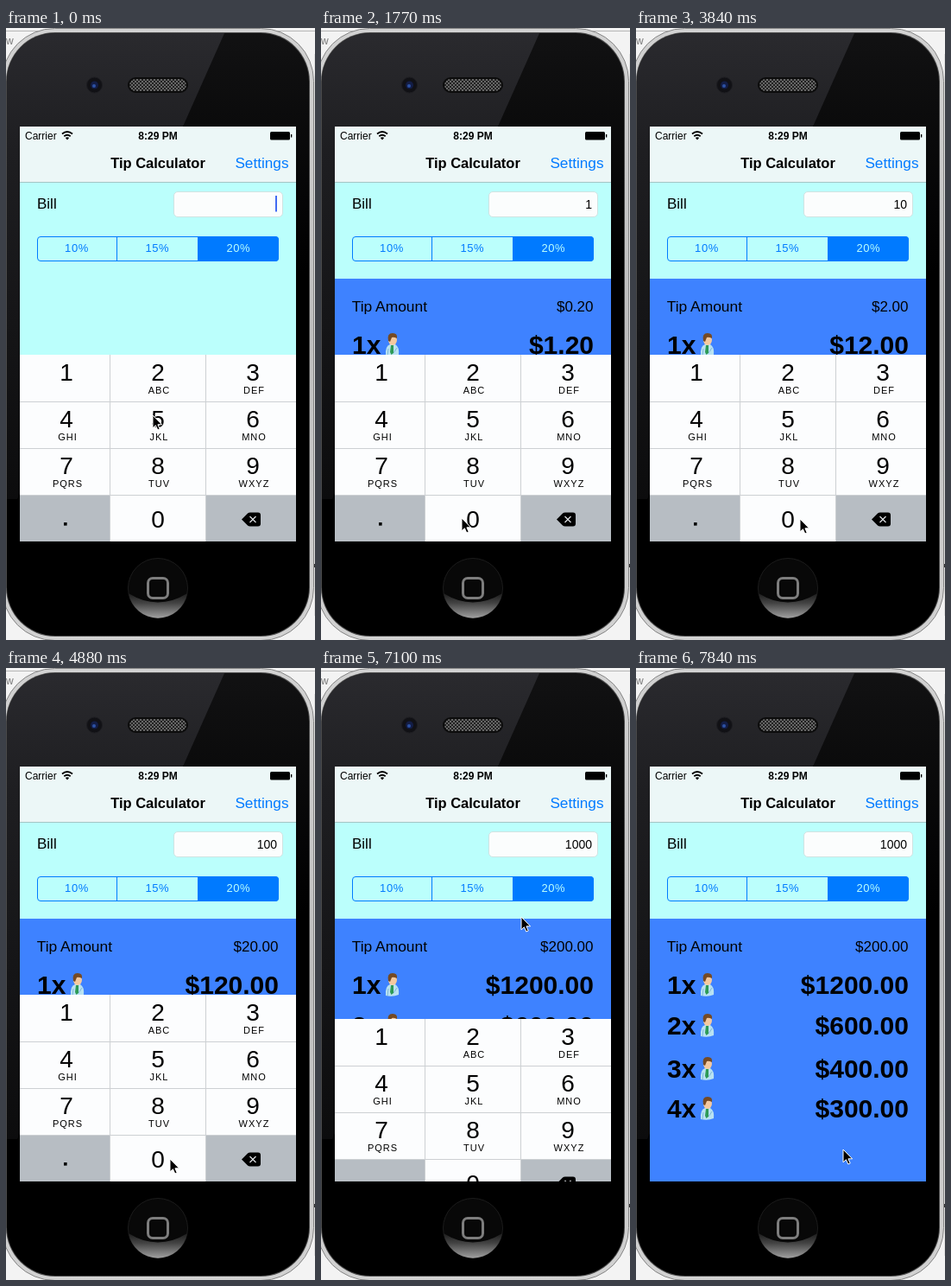
An HTML page for the animation above (8 s loop, 358x708 px).

```html
<!DOCTYPE html>
<html lang="en">
<head>
<meta charset="utf-8">
<title>Tip Calculator</title>
<style>
  html, body { margin: 0; width: 100%; height: 100%; overflow: hidden; background: #f3f3f3; }
  svg { display: block; font-family: "Liberation Sans", Arial, sans-serif; }
  .body { font-size: 17px; }
  .total { font-size: 30px; font-weight: bold; }
  .segment { font-size: 13px; letter-spacing: .6px; fill: #007aff; text-anchor: middle; }
  .digit { font-size: 28px; text-anchor: middle; }
  .letters { font-size: 11px; letter-spacing: 1px; text-anchor: middle; }
  .end { text-anchor: end; }
</style>
</head>
<body>
<svg width="358" height="708" viewBox="0 0 358 708">
  <defs>
    <clipPath id="screen"><rect x="16" y="114" width="320" height="480"/></clipPath>
    <clipPath id="front"><rect x="1" y="6" width="350" height="697" rx="56"/></clipPath>
    <linearGradient id="metal" x2="0" y2="1">
      <stop stop-color="#d2d2d2"/><stop offset=".5" stop-color="#bdbdbd"/><stop offset="1" stop-color="#d2d2d2"/>
    </linearGradient>
    <linearGradient id="glass" x2="0" y2="1">
      <stop stop-color="#121213"/><stop offset=".4" stop-color="#000"/>
    </linearGradient>
    <linearGradient id="glare" x2="0" y2="1">
      <stop stop-color="#2a2a2e"/><stop offset=".25" stop-color="#1e1e21"/><stop offset="1" stop-color="#0c0c0d"/>
    </linearGradient>
    <linearGradient id="home" x2="0" y2="1">
      <stop stop-color="#1c1c1c"/><stop offset=".4" stop-color="#444"/><stop offset="1" stop-color="#a0a0a0"/>
    </linearGradient>
    <pattern id="mesh" width="4" height="4" patternUnits="userSpaceOnUse">
      <rect width="4" height="4" fill="#222"/>
      <path d="M0 0L4 4M4 0L0 4" stroke="#777" stroke-width=".8"/>
    </pattern>
    <g id="person">
      <path d="M2 26Q1 15 7 13L13 13Q18 16 17 25Q10 28 2 26Z" fill="#b9e2f2"/>
      <path d="M4 26L5 18M15 17L11 23" stroke="#7fb8d8"/>
      <path d="M8 14L11 14L11 23L8.5 25L7 22Z" fill="#2e9b57"/>
      <ellipse cx="10" cy="8" rx="5" ry="6" fill="#f4c9a0"/>
      <path d="M5 9Q3 0 10 0Q16 0 15 6Q11 4 9 5L7 10Z" fill="#754a25"/>
    </g>
  </defs>

  <!-- Phone -->
  <path d="M0 3.5H358" stroke="#b5b5b5"/>
  <text x="0" y="19" font-size="12" fill="#777">w</text>
  <path d="M357.5 30V680" stroke="#ddd"/>
  <path d="M103 0V6M0 622H3M353 622H358" stroke="#333" stroke-width="4"/>
  <rect x="-4.5" y=".5" width="361" height="708" rx="61" fill="url(#metal)" stroke="#858585"/>
  <rect x="0" y="5" width="352" height="699" rx="57" fill="#4a4a4a"/>
  <g clip-path="url(#front)">
    <rect width="358" height="708" fill="url(#glass)"/>
    <path d="M0 6H253L13 545H0Z" fill="url(#glare)"/>
  </g>
  <circle cx="102.5" cy="66" r="9" fill="#111115" stroke="#1d1d21"/>
  <circle cx="102.5" cy="66" r="4.5" fill="#131d45"/>
  <circle cx="102" cy="67" r="2" fill="#2c52a5"/>
  <rect x="142" y="58" width="68" height="16" rx="8" fill="url(#mesh)" stroke="#0c0c0c" stroke-width="2"/>
  <circle cx="176" cy="648" r="34.5" fill="#080808" stroke="#1c1c1c"/>
  <path d="M142 654Q176 675 210 654A34.5 34.5 0 0 1 142 654Z" fill="url(#home)"/>
  <rect x="164.5" y="636.5" width="23" height="23" rx="5.5" fill="none" stroke="#7d7d7d" stroke-width="3"/>

  <g clip-path="url(#screen)">
    <rect x="16" y="114" width="320" height="480" fill="#bbfffc"/>
    <rect x="16" y="114" width="320" height="64" fill="#ecf7f7"/>
    <path d="M16 178.5H336" stroke="#a4c5c5"/>

    <!-- Status and navigation -->
    <text x="22" y="129" font-size="12">Carrier</text>
    <path d="M65 122.5Q71 117.5 77 122.5M67.3 125.3Q71 122.3 74.7 125.3" fill="none" stroke="#000" stroke-width="1.8"/>
    <path d="M68.8 127Q71 125.5 73.2 127L71 129.5Z"/>
    <text x="176" y="129" font-size="12" font-weight="bold" text-anchor="middle">8:29 PM</text>
    <rect x="306" y="120" width="23" height="9.5" rx="1.5"/>
    <path d="M330 123H331.3V126.5H330Z"/>
    <text x="176" y="162" font-size="16.5" font-weight="bold" text-anchor="middle">Tip Calculator</text>
    <text x="327.5" y="162" font-size="17.2" class="end" fill="#007aff">Settings</text>

    <!-- Bill -->
    <text x="36" y="209" class="body">Bill</text>
    <rect x="194.5" y="189.5" width="126" height="29" rx="4.5" fill="#fbfdfd" stroke="#cfe3e2"/>
    <text id="bill" x="314" y="209" font-size="14" class="end"></text>
    <rect id="caret" x="312" y="194" width="2" height="18.5" fill="#426bf2"/>
    <rect x="36.5" y="241.5" width="279" height="28" rx="3.5" fill="none" stroke="#007aff"/>
    <path d="M128.5 241V270" stroke="#007aff"/>
    <path d="M222 241H312Q316 241 316 245V266Q316 270 312 270H222Z" fill="#007aff"/>
    <text x="82" y="259" class="segment">10%</text>
    <text x="175.3" y="259" class="segment">15%</text>
    <text x="269.3" y="259" class="segment" style="fill:#bbfffc">20%</text>

    <g id="panel">
      <rect x="16" y="290" width="320" height="304" fill="#3e82ff"/>
      <text x="35.7" y="328" font-size="17.4">Tip Amount</text>
      <text id="tip" x="315.5" y="328" class="body end"></text>
    </g>
    <g id="keypad"><rect x="16" y="378" width="320" height="216" fill="#fcfdfe"/></g>
  </g>

  <path id="cursor" d="M0 0V14.8L3.4 11.7L5.8 17L8.2 16L5.9 10.8H10.6Z" stroke="#fff"/>
</svg>
<script>
const STEP = 147.9, LOOP = 8000;
const $ = id => document.getElementById(id);

function add(parent, tag, attrs, text = '') {
  const node = document.createElementNS('http://www.w3.org/2000/svg', tag);
  for (const name in attrs) node.setAttribute(name, attrs[name]);
  node.textContent = text;
  return parent.appendChild(node);
}

const totals = [377, 424, 474, 520].map((y, i) => {
  add($('panel'), 'text', { x: 36, y, class: 'total' }, `${i + 1}x`);
  add($('panel'), 'use', { href: '#person', x: 73, y: y - 24 });
  return add($('panel'), 'text', { x: 316, y, class: 'total end' });
});

const keypad = $('keypad'), keys = {};
const columns = [[16, 104.5, 70], [121, 110.5, 176], [232, 104, 286]];
const letters = ['', 'ABC', 'DEF', 'GHI', 'JKL', 'MNO', 'PQRS', 'TUV', 'WXYZ'];
[...'123456789.0<'].forEach((label, i) => {
  const [x, width, center] = columns[i % 3], y = 378 + 54 * Math.floor(i / 3);
  const plain = '.<'.includes(label) ? '#b7bdc3' : '#fcfdfe';
  keys[label] = add(keypad, 'rect', { x, y, width, height: 54, fill: plain });
  if (label === '.') add(keypad, 'rect', { x: 67, y: 572, width: 3.6, height: 3.6 });
  else if (label !== '<') add(keypad, 'text', { x: center, y: y + (label === '0' ? 37.5 : 30), class: 'digit' }, label);
  if (letters[i]) add(keypad, 'text', { x: center + 1.5, y: y + 45, class: 'letters' }, letters[i]);
});
add(keypad, 'path', { d: 'M120.5 378V594M231.5 378V594M16 432.5H336M16 486.5H336M16 540.5H336', stroke: '#cdd0d3' });
add(keypad, 'path', { d: 'M273 568.5L280 561.5Q281 560.5 283 560.5H292Q295 560.5 295 563.5V573.5Q295 576.5 292 576.5H283Q281 576.5 280 575.5Z' });
add(keypad, 'path', { d: 'M282.5 565L289.5 572M289.5 565L282.5 572', stroke: '#dfe2e5', 'stroke-width': 1.2 });

// Step, x, y of the pointer tip
const pointerPath = [
  [0, 170, 448], [1, 150, 440], [3, 72, 400], [6, 70, 398], [7, 100, 470], [8, 158, 560], [12, 163, 567],
  [15, 163, 567], [16, 182, 540], [17, 225, 430], [18, 245, 367], [19, 245, 367], [21, 218, 470],
  [23, 191, 567], [24, 190, 568], [43, 190, 568], [44, 193, 550], [46, 225, 340], [47, 232, 288],
  [50, 232, 288], [51, 234, 340], [52, 238, 500], [53, 240, 557], [55, 240, 557]
];
// Step at which each bill amount appears
const bills = [[0, ''], [6, 1], [14, 10], [29, 100], [36, 1000]];
const presses = { 5: '1', 13: '0', 28: '0', 35: '0' };
const caretResets = [0, 6, 13, 28, 36];

function pointerAt(step) {
  const i = pointerPath.findIndex(p => p[0] > step);
  const [s0, x0, y0] = pointerPath[i - 1], [s1, x1, y1] = pointerPath[i];
  const k = (step - s0) / (s1 - s0);
  return [x0 + (x1 - x0) * k, y0 + (y1 - y0) * k];
}

function caretAt(step) {
  if (step >= 48) return 0;
  const phase = (step - caretResets.findLast(s => s <= step)) % 7;
  return phase < 4 ? 1 : phase === 4 ? .5 : 0;
}

// Critically damped spring, from 0 to 1
function spring(seconds) {
  const w = 18.26 * Math.max(0, seconds);
  return 1 - (1 + w) * Math.exp(-w);
}

const shift = (id, x, y) => $(id).setAttribute('transform', `translate(${x} ${y})`);

function render(time) {
  const step = Math.floor((time + 5) / STEP);
  const bill = bills.findLast(([s]) => s <= step)[1];
  $('bill').textContent = bill;
  $('tip').textContent = '$' + (bill * .2).toFixed(2);
  totals.forEach((node, i) => node.textContent = '$' + (bill * 1.2 / (i + 1)).toFixed(2));
  $('caret').setAttribute('opacity', caretAt(step));

  const entered = Math.min(1, Math.max(0, (step - 5.5) / 2.2));
  shift('panel', 0, 304 * (1 - entered) ** 2);
  shift('keypad', 0, Math.round(216 * spring((step - 47.768) * STEP / 1000)));
  shift('cursor', ...pointerAt(step));
  for (const label of '10') keys[label].setAttribute('fill', presses[step] === label ? '#b7bdc3' : '#fcfdfe');
}

function tick() {
  render(performance.now() % LOOP);
  requestAnimationFrame(tick);
}
tick();
</script>
</body>
</html>
```
